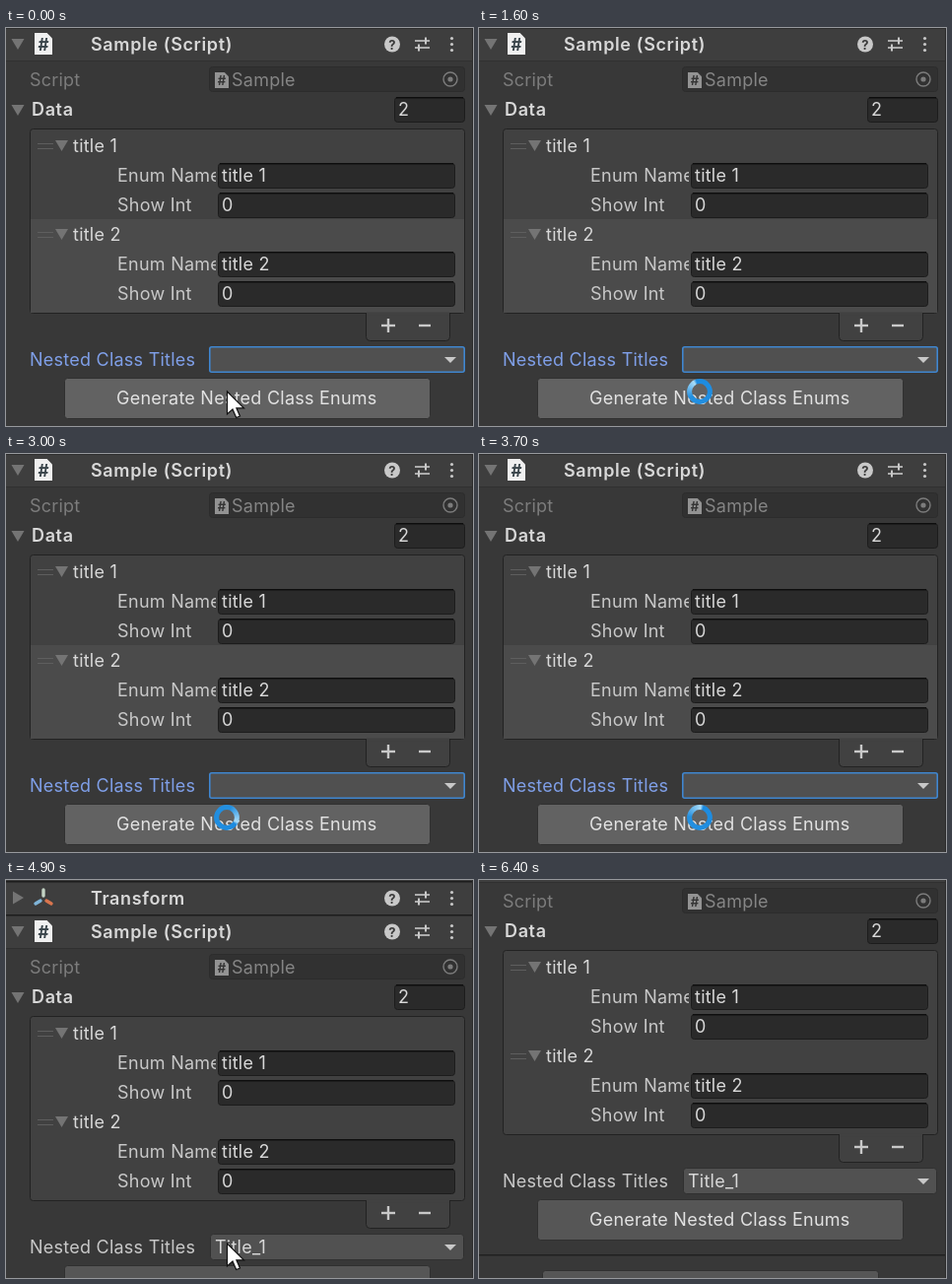
These frames come from a looping animation (474 by 404 pixels, 6.5 s). An HTML page with a canvas:

```html
<!DOCTYPE html>
<html lang="en">
<head>
<meta charset="utf-8">
<title>Inspector</title>
<style>
  html, body { margin: 0; width: 100%; height: 100%; overflow: hidden; background: #383838; }
  canvas { display: block; }
</style>
</head>
<body>
<canvas id="stage" width="474" height="404"></canvas>
<script>
const ctx = document.getElementById('stage').getContext('2d');
const W = 474, H = 404, LOOP = 6500, STEP = 100;
const RELOAD = 4700, BUSY_FROM = 900, BUSY_TO = 4300;
const TEXT = '#c8c8c8', BRIGHT = '#d8d8d8', DIM = '#7c7c7c';

const clamp01 = v => Math.max(0, Math.min(1, v));
const ease = v => v * v * (3 - 2 * v);
const tween = (t, from, to, a, b) => a + (b - a) * ease(clamp01((t - from) / (to - from)));

function rect(x, y, w, h, color) {
  ctx.fillStyle = color;
  ctx.fillRect(x, y, w, h);
}

function box(x, y, w, h, r, fill, border, line = 1) {
  ctx.beginPath();
  ctx.roundRect(x + line / 2, y + line / 2, w - line, h - line, r);
  ctx.fillStyle = fill;
  ctx.fill();
  ctx.strokeStyle = border;
  ctx.lineWidth = line;
  ctx.stroke();
}

function poly(points, color) {
  ctx.beginPath();
  points.forEach(([x, y]) => ctx.lineTo(x, y));
  ctx.closePath();
  ctx.fillStyle = color;
  ctx.fill();
}

function line(x1, y1, x2, y2, color, width) {
  ctx.beginPath();
  ctx.moveTo(x1, y1);
  ctx.lineTo(x2, y2);
  ctx.strokeStyle = color;
  ctx.lineWidth = width;
  ctx.stroke();
}

function dot(x, y, r, color) {
  ctx.beginPath();
  ctx.arc(x, y, r, 0, Math.PI * 2);
  ctx.fillStyle = color;
  ctx.fill();
}

// Text is placed by its left edge and baseline.
function label(str, x, y, color = TEXT, bold = false) {
  ctx.font = (bold ? '600 ' : '') + '18px Inter, sans-serif';
  ctx.letterSpacing = bold ? '0.63px' : '0.24px';
  ctx.fillStyle = color;
  ctx.fillText(str, x, y);
}

function symbol(str, x, y, size, color) {
  ctx.font = `700 ${size}px Inter, sans-serif`;
  ctx.letterSpacing = '0px';
  ctx.textAlign = 'center';
  ctx.fillStyle = color;
  ctx.fillText(str, x, y);
  ctx.textAlign = 'left';
}

const foldDown = (x, y, color = '#747474') =>
  poly([[x - 6.5, y - 5], [x + 6.5, y - 5], [x, y + 6]], color);
const foldRight = (x, y) => poly([[x - 5, y - 6.5], [x + 6, y], [x - 5, y + 6.5]], '#747474');

function scriptIcon(x, y, w, h, paper, ink, size) {
  const c = w * 0.3;
  poly([[x, y], [x + w - c, y], [x + w, y + c], [x + w, y + h], [x, y + h]], paper);
  symbol('#', x + w / 2, y + h / 2 + size * 0.4, size, ink);
}

function axesIcon(x, y) {
  ctx.lineCap = 'round';
  line(x, y - 2, x, y - 8, '#c3d3c4', 3.4);
  line(x - 3, y + 3, x - 8, y + 6, '#7fb4d8', 3.4);
  line(x + 3, y + 3, x + 8, y + 6, '#d9754e', 3.4);
  ctx.lineCap = 'butt';
}

function header(y, title) {
  rect(0, y, W, 34, '#3e3e3e');
  rect(0, y - 1, W, 1.5, '#1c1c1c');
  rect(0, y + 33, W, 1, '#303030');
  label(title, 86, y + 23, BRIGHT, true);
  dot(392, y + 16.5, 8, '#c8c8c8');
  symbol('?', 392, y + 21.5, 13, '#3a3a3a');
  line(415, y + 13, 430, y + 13, '#c8c8c8', 1.6);
  line(415, y + 20, 430, y + 20, '#c8c8c8', 1.6);
  line(426, y + 9.5, 426, y + 16.5, '#c8c8c8', 2);
  line(419, y + 16.5, 419, y + 23.5, '#c8c8c8', 2);
  for (const d of [-6, 0, 6]) dot(452.5, y + 16.5 + d, 1.6, '#c8c8c8');
}

function field(x, y, w, value) {
  box(x, y, w, 26, 3, '#2a2a2a', '#1c1c1c');
  rect(x + 2, y, w - 4, 1.5, '#0e0e0e');
  label(value, x + 4, y + 19, BRIGHT);
}

function clippedLabel(str, x, y, right) {
  ctx.save();
  ctx.beginPath();
  ctx.rect(x, y - 20, right - x, 28);
  ctx.clip();
  label(str, x, y);
  ctx.restore();
}

function element(y, name) {
  line(32, y + 3.5, 48, y + 3.5, '#5e5e5e', 1);
  line(32, y + 8.5, 48, y + 8.5, '#5e5e5e', 1);
  foldDown(56.5, y + 5);
  label(name, 68, y + 12, BRIGHT);
  clippedLabel('Enum Name', 113, y + 42, 213);
  field(215, y + 23, 241, name);
  label('Show Int', 113, y + 72);
  field(215, y + 53, 241, '0');
}

function list(fresh) {
  box(365, 285, 86, 33, 4, '#414141', '#222');
  box(24, 102, 442, 188, 3, '#414141', '#222');
  if (!fresh) rect(25, 194, 440, 95, '#4b4b4b');
  rect(366, 288.5, 84, 3, '#414141');
  element(114, 'title 1');
  element(204, 'title 2');
  line(381, 302, 395, 302, '#c8c8c8', 2.4);
  line(388, 295, 388, 309, '#c8c8c8', 2.4);
  line(419, 302, 431, 302, '#c8c8c8', 2.4);
}

function dropdown(fresh) {
  label('Nested Class Titles', 24, 343, fresh ? TEXT : '#7f9fe8');
  if (fresh) {
    box(207, 323, 258, 27, 3, '#515151', '#303030');
    label('Title_1', 212, 343, BRIGHT);
  } else {
    box(206, 323, 260, 27, 2, '#505050', '#3f86d0', 1.6);
  }
  poly([[445, 334], [457, 334], [451, 340]], '#c8c8c8');
}

function panel(fresh) {
  header(-34, 'Transform');
  foldRight(12, -18);
  axesIcon(38, -18);
  header(0, 'Sample (Script)');
  foldDown(12, 16);
  scriptIcon(29, 5, 18, 22, '#f0f0f0', '#39444a', 17);

  label('Script', 24, 58.5, DIM);
  box(206, 39, 260, 26, 3, '#313131', '#2c2c2c');
  scriptIcon(212, 45, 14, 16, '#939393', '#353535', 13);
  label('Sample', 229, 58.5, '#858585');
  ctx.beginPath();
  ctx.arc(451, 52, 7, 0, Math.PI * 2);
  ctx.strokeStyle = DIM;
  ctx.lineWidth = 1.4;
  ctx.stroke();
  dot(451, 52, 2.6, DIM);

  foldDown(12, 83);
  label('Data', 26, 89, BRIGHT, true);
  field(394, 70, 72, '2');
  list(fresh);
  dropdown(fresh);

  box(59, 355, 372, 42, 3, fresh ? '#565656' : '#626262', '#303030');
  label('Generate Nested Class Enums', 112, 382, '#e2e2e2');
  rect(0, 411, W, 1.5, '#202020');
  box(64, 427, 342, 36, 3, '#565656', '#303030');
}

function arrow(x, y) {
  ctx.save();
  ctx.translate(x, y);
  ctx.beginPath();
  [[0, 0], [0, 23], [5.5, 18], [9.2, 26.5], [13, 25], [9.4, 16.8], [17, 16.8]]
    .forEach(([px, py]) => ctx.lineTo(px, py));
  ctx.closePath();
  ctx.fillStyle = '#fff';
  ctx.fill();
  ctx.strokeStyle = '#111';
  ctx.lineWidth = 1.2;
  ctx.stroke();
  ctx.restore();
}

function spinner(x, y, t) {
  const turn = (t - 3000) / 1000 * Math.PI * 2;
  const ring = ctx.createConicGradient(turn + 0.4, x, y);
  ring.addColorStop(0, '#a9dcf8');
  ring.addColorStop(0.04, '#1c8be0');
  ring.addColorStop(0.75, '#2490e0');
  ring.addColorStop(1, '#a9dcf8');
  ctx.beginPath();
  ctx.arc(x, y, 10.4, 0, Math.PI * 2);
  ctx.strokeStyle = ring;
  ctx.lineWidth = 5;
  ctx.stroke();
}

function pointer(t) {
  if (t >= BUSY_FROM && t < BUSY_TO) return spinner(224, 369, t);
  const x = tween(t, 4900, 5400, 224.5, 253) + tween(t, 5900, 6200, 0, 235);
  const y = tween(t, 4900, 5400, 369, 358) - tween(t, 5900, 6200, 0, 100);
  arrow(x, y);
}

function draw(t) {
  const fresh = t >= RELOAD;
  const scroll = fresh ? Math.round(tween(t, 6100, 6400, 36, -31)) : 0;
  rect(0, 0, W, H, '#383838');
  ctx.save();
  ctx.translate(0, scroll);
  panel(fresh);
  ctx.restore();
  rect(W - 1, 0, 1, H, '#2a2a2a');
  pointer(t);
}

const start = performance.now();
function tick() {
  const t = (performance.now() - start) % LOOP;
  draw(Math.floor(t / STEP) * STEP);
  requestAnimationFrame(tick);
}
tick();
</script>
</body>
</html>
```
